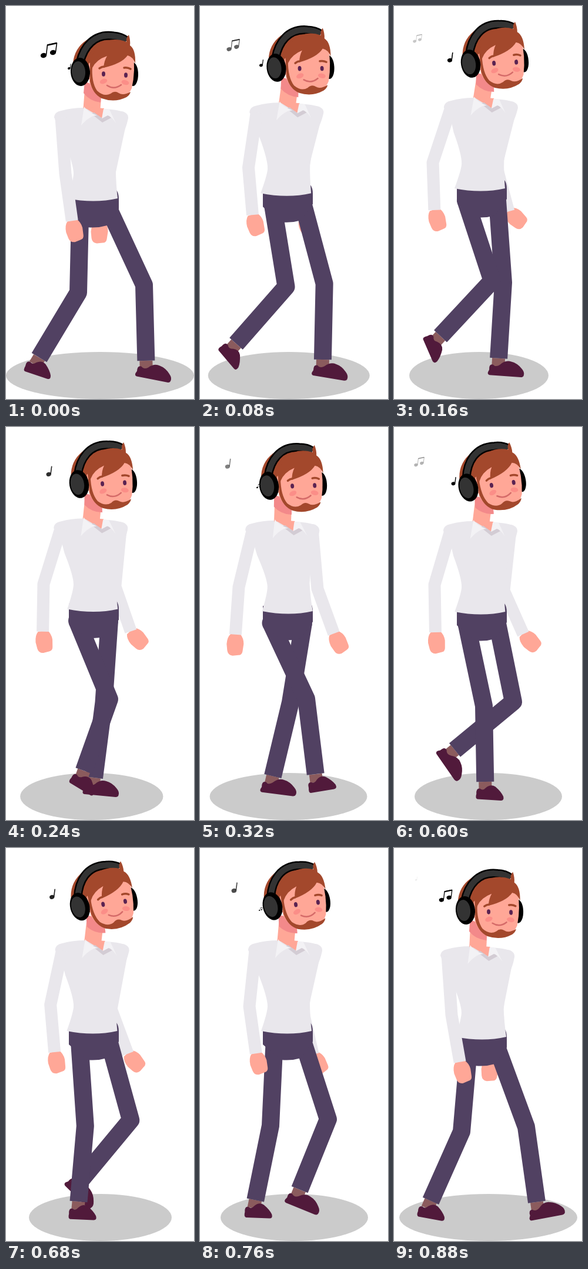
An HTML page with a canvas that plays this animation: 320x668 px, repeating every 920 ms.

```html
<!DOCTYPE html>
<html lang="en">
<head>
<meta charset="utf-8">
<title>Walking to music</title>
<style>
html, body { margin: 0; width: 100%; height: 100%; overflow: hidden; background: #fff; }
canvas { display: block; }
</style>
</head>
<body>
<canvas id="stage" width="320" height="668"></canvas>
<script>
const ctx = document.getElementById('stage').getContext('2d');
const LOOP = 920, STEP = 40, RAD = Math.PI / 180;
const PANTS = '#514162', SHIRT = '#e9e7ec', SKIN = '#ffa797', HAIR = '#a3482c', SHOE = '#511a3b';

// Pose times; every channel below has one value per time.
const TIMES = [0, 160, 320, 440, 600, 760, 880];
const body = {
  bob: [0, -17, -14, 0, -13, -16, -6],
  lean: [0, 3, -5, -5, 2, 0, -3],
  headX: [126, 130, 117, 116, 126, 123, 121],
  headY: [112, 98, 100, 115, 103, 99, 106],
  nod: [0, -6, -4.5, -3, -10.5, -9, -1.5],
  groundX: [160, 144.5, 150.5, 160, 160.5, 160.5, 160.5],
  groundR: [160, 118.5, 134, 160, 125.5, 125.5, 151.5]
};
// x, y: knee or elbow; lower: shin or forearm angle; tip: foot or hand angle.
const nearLeg = {
  x: [123, 167, 181, 190, 153, 120, 115],
  y: [487, 467, 462, 470, 474, 472, 482],
  lower: [-31, -43, 7, 13.5, 1, -11.5, -24],
  tip: [17, 65, -11, 4, 2, 1, 9]
};
const farLeg = {
  x: [235, 186, 154, 164, 203, 218, 225],
  y: [474, 470, 468, 478, 467, 461, 474],
  lower: [1.5, -3.5, -13.5, -33, -50.5, -22, 8],
  tip: [9, 2, 5, 3, 53, 20, -13]
};
const nearArm = {
  x: [101, 66, 66, 64, 69, 84, 98],
  y: [285, 266, 272, 286, 268, 269, 284],
  lower: [8, 2, -4, -9, 1, 8, 10],
  tip: [16, 18, 0, -4, 9, 17, 17]
};
const farArm = {
  x: [175, 174, 200, 212, 187, 174, 174],
  y: [288, 271, 275, 289, 278, 272, 280],
  lower: [-11, 15, 20, 19, 24, 13, -7],
  tip: [0, 50, 30, 18, 46, 32, -2]
};
// Note paths: phase, x, y, scale, opacity.
const pairPath = [[0, 104, 105, .2, 1], [.08, 100, 100, .3, 1], [.267, 88, 81, .8, 1], [.35, 73, 75, 1, 1],
  [.683, 43, 59, .62, .3], [.714, 40, 55, .55, .22], [.8, 35, 51, .4, 0]];
const singlePath = [[0, 108, 103, .55, 1], [.333, 102, 92, .8, 1], [.364, 96, 87, .95, 1],
  [.667, 59, 67, 1, .7], [.727, 48, 62, .95, .5], [.917, 38, 52, .4, .07], [.96, 36, 50, .3, 0]];

const FOOT_NEAR = 'M-15 7Q-16-3-9-2Q-4 2 1-4Q9-11 17-6Q27 2 31 10Q33 17 27 17L-13 16Q-17 15-15 7Z';
const FOOT_FAR = 'M-15 6Q-16-4-9-3Q-4 2 3-3Q12-12 22-9Q32-7 40 2Q46 8 44 14Q43 17 39 17L-14 15Q-18 14-17 10Z';
const HAND = 'M-8-1L8-1Q14 6 14 16L12 29Q11 35 5 35L-5 36Q-13 35-14 27L-15 16Q-14 4-8-1Z';

// Smooth periodic curve through the pose values.
function curve(values, t) {
  const n = TIMES.length;
  const time = i => TIMES[(i + n) % n] + LOOP * Math.floor(i / n);
  const value = i => values[(i + n) % n];
  const slope = i => (value(i + 1) - value(i - 1)) / (time(i + 1) - time(i - 1));
  let i = n - 1;
  while (TIMES[i] > t) i--;
  const span = time(i + 1) - time(i), u = (t - time(i)) / span, v = 1 - u;
  return v * v * (1 + 2 * u) * value(i) + u * u * (1 + 2 * v) * value(i + 1) +
    span * u * v * (v * slope(i) - u * slope(i + 1));
}
const pose = (channels, t) =>
  Object.fromEntries(Object.entries(channels).map(([name, v]) => [name, curve(v, t)]));

function fill(color, path) {
  ctx.fillStyle = color;
  ctx.fill(new Path2D(path));
}
function stroke(color, width, path) {
  ctx.strokeStyle = color;
  ctx.lineWidth = width;
  ctx.stroke(new Path2D(path));
}
function oval(color, x, y, rx, ry, turn = 0) {
  ctx.fillStyle = color;
  ctx.beginPath();
  ctx.ellipse(x, y, rx, ry, turn * RAD, 0, 7);
  ctx.fill();
}
function placed(x, y, degrees, draw) {
  ctx.save();
  ctx.translate(x, y);
  ctx.rotate(degrees * RAD);
  draw();
  ctx.restore();
}
const along = (x, y, angle, length) =>
  [x + length * Math.sin(angle * RAD), y + length * Math.cos(angle * RAD)];

function drawLeg(leg, hipX, hipY, foot) {
  const ankle = along(leg.x, leg.y, leg.lower, 129);
  const heel = along(...ankle, leg.lower, 14);
  stroke('#8b5b5d', 22, `M${ankle}L${heel}`);
  placed(...heel, leg.tip, () => fill(SHOE, foot));
  oval(PANTS, hipX, hipY, 15, 15);
  stroke(PANTS, 30, `M${hipX} ${hipY}L${leg.x} ${leg.y}L${ankle}`);
}

function drawArm(arm, shoulderX, shoulderY) {
  const wrist = along(arm.x, arm.y, arm.lower, 81);
  placed(...wrist, -arm.tip, () => fill(SKIN, HAND));
  oval(SHIRT, shoulderX, shoulderY, 11, 11);
  stroke(SHIRT, 21, `M${shoulderX} ${shoulderY}L${arm.x} ${arm.y}L${wrist}`);
}

function drawShirt() {
  fill(SHIRT, 'M82 190Q82 180 94 178Q112 173 132 173L166 175Q190 176 199 180Q211 183 207 195' +
    'Q205 205 199 217Q190 250 187 280Q187 300 190 327Q150 336 104 327Q115 295 115 285Q115 270 100 232L92 200Z');
}

function drawCollar() {
  fill(SKIN, 'M131 171L164 191L167 174Z');
  fill('#d3ccd4', 'M145 183L164 198L179 190L174 185L164 191L150 181Z');
  fill('#f3f2f5', 'M133 171L128 203Q137 192 148 187L155 186Q138 180 133 171Z');
  fill('#f3f2f5', 'M166 175L176 176L187 199Q179 187 173 186L163 191Z');
}

function drawHead() {
  fill('#f3898a', 'M134 128L163 140L161 164Q143 162 132 148Z');
  oval('#000', 216, 116, 9, 20);
  fill(HAIR, 'M114 98Q116 72 137 58Q160 44 190 50L205 70L146 128L125 112Z');
  stroke('#000', 15, 'M126 96C132 70 150 46 183 51Q196 52 205 59');
  stroke('#333', 10, 'M126 96C132 70 150 46 183 51Q196 52 205 59');
  fill(SKIN, 'M141 98L170 70L216 76Q221 110 214 140Q206 158 181 160Q150 157 142 130Z');
  fill(HAIR, 'M143 95L143 128Q147 149 163 157Q185 165 205 155Q211 151 212 146Q199 153 192 148' +
    'Q185 143 178 149Q167 155 155 144Q145 130 147 100Z');
  fill(HAIR, 'M143 118L143 95Q151 67 171 59Q188 54 205 61Q204 54 209 49Q212 58 211 67Q221 74 220 98' +
    'Q216 86 207 84Q197 98 166 105Q167 93 172 85Q154 91 147 105Z');
  oval('#fb8e88', 166, 128, 6.5, 4, -20);
  oval('#fb8e88', 203, 130, 6.5, 4, 15);
  oval('#5a2352', 166, 115.5, 3, 4.2);
  oval('#5a2352', 204, 117.5, 3, 4.2);
  ctx.lineCap = 'round';
  stroke(HAIR, 3.5, 'M159 106Q163 103 167 103M201 105Q207 104 212 107');
  stroke('#d56b69', 2.5, 'M172 135Q184 143 196 134');
  ctx.lineCap = 'butt';
  oval('#000', 126.5, 112, 16.5, 24, -4);
  oval('#333', 123.5, 112, 11.5, 18, -4);
}

function drawNote(path, phase, isPair) {
  const i = path.findIndex(k => k[0] > phase);
  if (i < 1) return;
  const a = path[i - 1], b = path[i], u = (phase - a[0]) / (b[0] - a[0]);
  const [, x, y, scale, alpha] = a.map((v, j) => v + (b[j] - v) * u);
  placed(x, y, 0, () => {
    ctx.scale(scale, scale);
    ctx.globalAlpha = alpha;
    if (isPair) {
      oval('#000', -9, 9, 5.2, 4.2, -15);
      oval('#000', 7, 4, 5.2, 4.2, -15);
      stroke('#000', 1.6, 'M-4.5 8L-2.5-9L13.5-12L11.5 3');
      stroke('#000', 2.5, 'M-2.5-8.5L13.5-12');
    } else {
      oval('#000', -1.2, 5.5, 4.3, 3.6, -15);
      stroke('#000', 1.7, 'M2.2 5L4-8.5');
    }
  });
}

function render(t) {
  const b = pose(body, t);
  const leanAt = (x, y) => x + b.lean * (290 - y) / 105;
  const leaning = draw => {
    ctx.save();
    ctx.transform(1, 0, -b.lean / 105, 1, b.lean * 290 / 105, b.bob);
    draw();
    ctx.restore();
  };
  ctx.clearRect(0, 0, 320, 668);
  ctx.lineJoin = 'round';
  oval('#cbcbcb', b.groundX, 628, b.groundR, 40);

  // The second step of the walk is one drawing longer than the first.
  const phase = t < 440 ? t / 440 : (t - 440) / 480;
  drawNote(pairPath, (phase + .35) % 1, true);
  drawNote(singlePath, phase, false);

  const shoulderY = 190 + b.bob, hipY = 347 + b.bob;
  drawArm(pose(farArm, t), leanAt(196, 190), shoulderY);
  const near = pose(nearLeg, t);
  drawLeg(pose(farLeg, t), 176, hipY, FOOT_FAR);
  drawLeg(near, 126 - .1 * (near.x - 126), hipY, FOOT_NEAR);
  placed(0, b.bob, 0, () =>
    fill(PANTS, 'M107 318L188 313Q192 318 192 328L192 345L172 373Q155 378 138 376L107 350Z'));
  leaning(drawShirt);

  const turn = b.nod * RAD, cos = Math.cos(turn), sin = Math.sin(turn);
  const chin = [b.headX + 23 * cos - 24 * sin, b.headY + 23 * sin + 24 * cos];
  stroke(SKIN, 29, `M${leanAt(146, 175)} ${175 + b.bob}L${chin}`);
  leaning(drawCollar);
  placed(b.headX, b.headY, b.nod, () => {
    ctx.translate(-126, -112);
    drawHead();
  });
  drawArm(pose(nearArm, t), leanAt(94, 190), shoulderY);
}

function tick() {
  render(Math.floor(performance.now() % LOOP / STEP) * STEP);
  requestAnimationFrame(tick);
}
tick();
</script>
</body>
</html>
```
